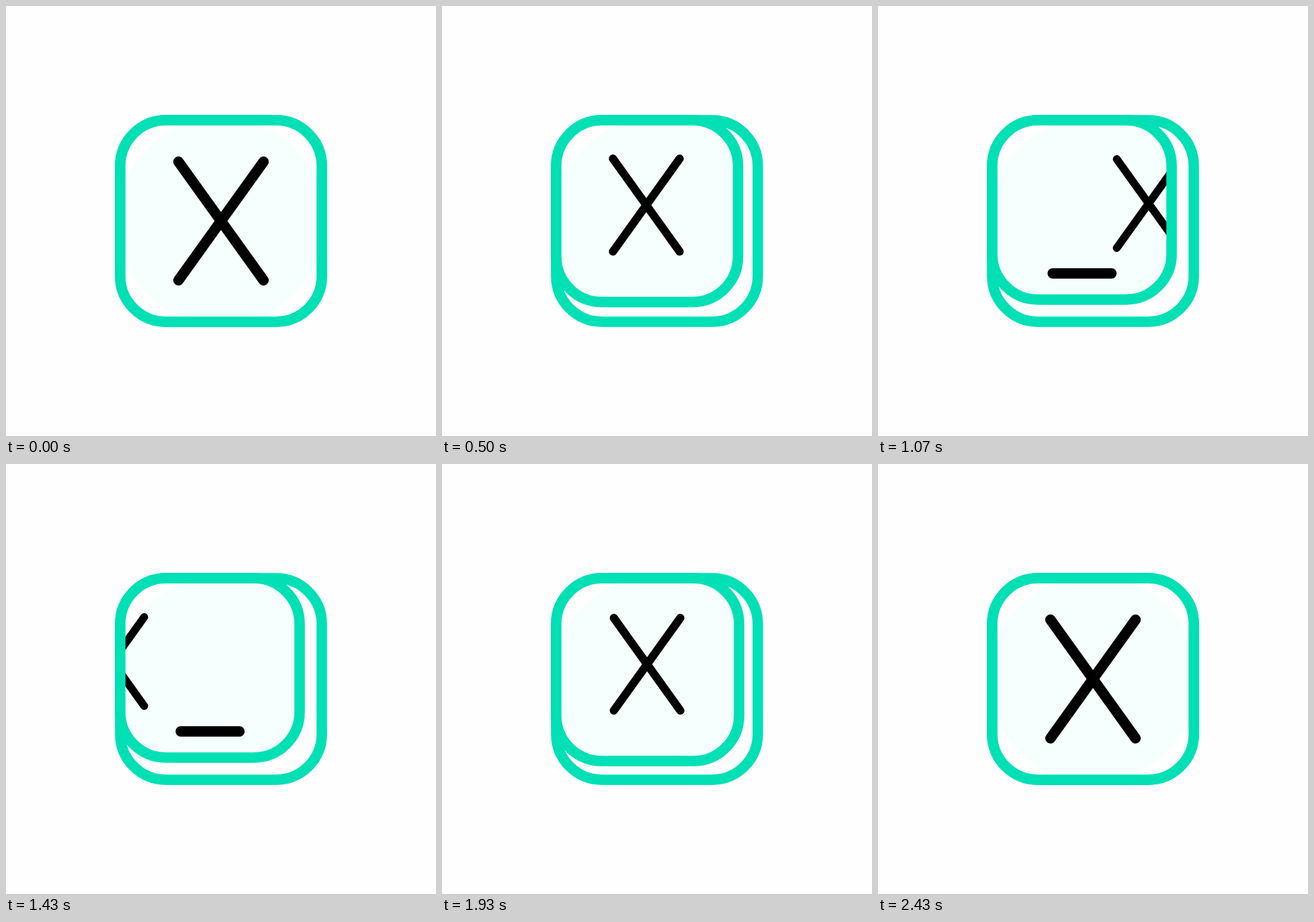
An HTML page with a canvas for the animation above (2780 ms loop, 640 by 640 pixels).

```html
<!DOCTYPE html>
<html lang="en">
<head>
<meta charset="utf-8">
<title>Resizing tile</title>
<style>
  html, body { margin: 0; height: 100%; overflow: hidden; background: #fefefe; }
  canvas { display: block; width: 100vmin; height: 100vmin; }
</style>
</head>
<body>
<canvas id="stage" width="640" height="640"></canvas>
<script>
const ctx = document.getElementById('stage').getContext('2d');
const LOOP = 2780, STEP = 1000 / 14, LAST = 34;
const PAPER = '#fefefe', GREEN = '#00e0b5', TINT = '#f5fffd', INK = '#000';
const EDGE = 170, FULL = 300, SMALL = 267, RADIUS = 68, BORDER = 15.6;

const mix = (a, b, k) => a + (b - a) * k;
const progress = (f, from, to) => Math.min(1, Math.max(0, (f - from) / (to - from)));
const smooth = (f, from, to) => {
  const k = progress(f, from, to);
  return k * k * (3 - 2 * k);
};
const sineOut = (f, from, to) => Math.sin(progress(f, from, to) * Math.PI / 2);
const quadOut = (f, from, to) => 1 - (1 - progress(f, from, to)) ** 2;

function tilePath(size, inset = 0) {
  ctx.beginPath();
  ctx.roundRect(EDGE + inset, EDGE + inset, size - 2 * inset, size - 2 * inset, RADIUS - inset);
}

function strokeTile(size) {
  tilePath(size);
  ctx.lineWidth = BORDER;
  ctx.strokeStyle = GREEN;
  ctx.stroke();
}

function line(x1, y1, x2, y2, width) {
  ctx.beginPath();
  ctx.moveTo(x1, y1);
  ctx.lineTo(x2, y2);
  ctx.lineWidth = width;
  ctx.strokeStyle = INK;
  ctx.stroke();
}

function drawCross(cx, cy, scale) {
  const w = 63.3 * scale, h = 88.2 * scale;
  line(cx - w, cy - h, cx + w, cy + h, 15.6 * scale);
  line(cx + w, cy - h, cx - w, cy + h, 15.6 * scale);
}

function slideOffset(f) {
  return f < 18.2 ? 180 * smooth(f, 11.5, 18) : -180 * (1 - smooth(f, 18.4, 24));
}

function draw(f) {
  // Each value runs from 0 (full size) to 1 (small) and back.
  const shrink = sineOut(f, 0, 10) - smooth(f, 25, 33);
  const shift = quadOut(f, 0, 10) - smooth(f, 25, 33);
  const scaleDown = sineOut(f, 0, 10.5) - smooth(f, 25, 34);
  const size = mix(FULL, SMALL, shrink);

  ctx.fillStyle = PAPER;
  ctx.fillRect(0, 0, 640, 640);
  ctx.lineCap = 'round';
  strokeTile(FULL);

  tilePath(size);
  ctx.fill();
  ctx.save();
  tilePath(size, BORDER / 2 - 1);
  ctx.clip();
  ctx.beginPath();
  ctx.arc(320, 320, 154, 0, 2 * Math.PI);
  ctx.fillStyle = TINT;
  ctx.fill();

  drawCross(mix(320, 302.5, shift) + slideOffset(f), mix(320, 294, shift), mix(1, 0.75, scaleDown));

  const start = mix(260, 347.5, smooth(f, 21.6, 25.6));
  const end = mix(260, 347.5, smooth(f, 7, 11));
  if (end > start) line(start, 398, end, 398, 15.4);
  ctx.restore();

  strokeTile(size);
}

const origin = performance.now();
function tick() {
  const t = (performance.now() - origin) % LOOP;
  draw(Math.min(LAST, Math.floor((t + 5) / STEP)));
  requestAnimationFrame(tick);
}
tick();
</script>
</body>
</html>
```
